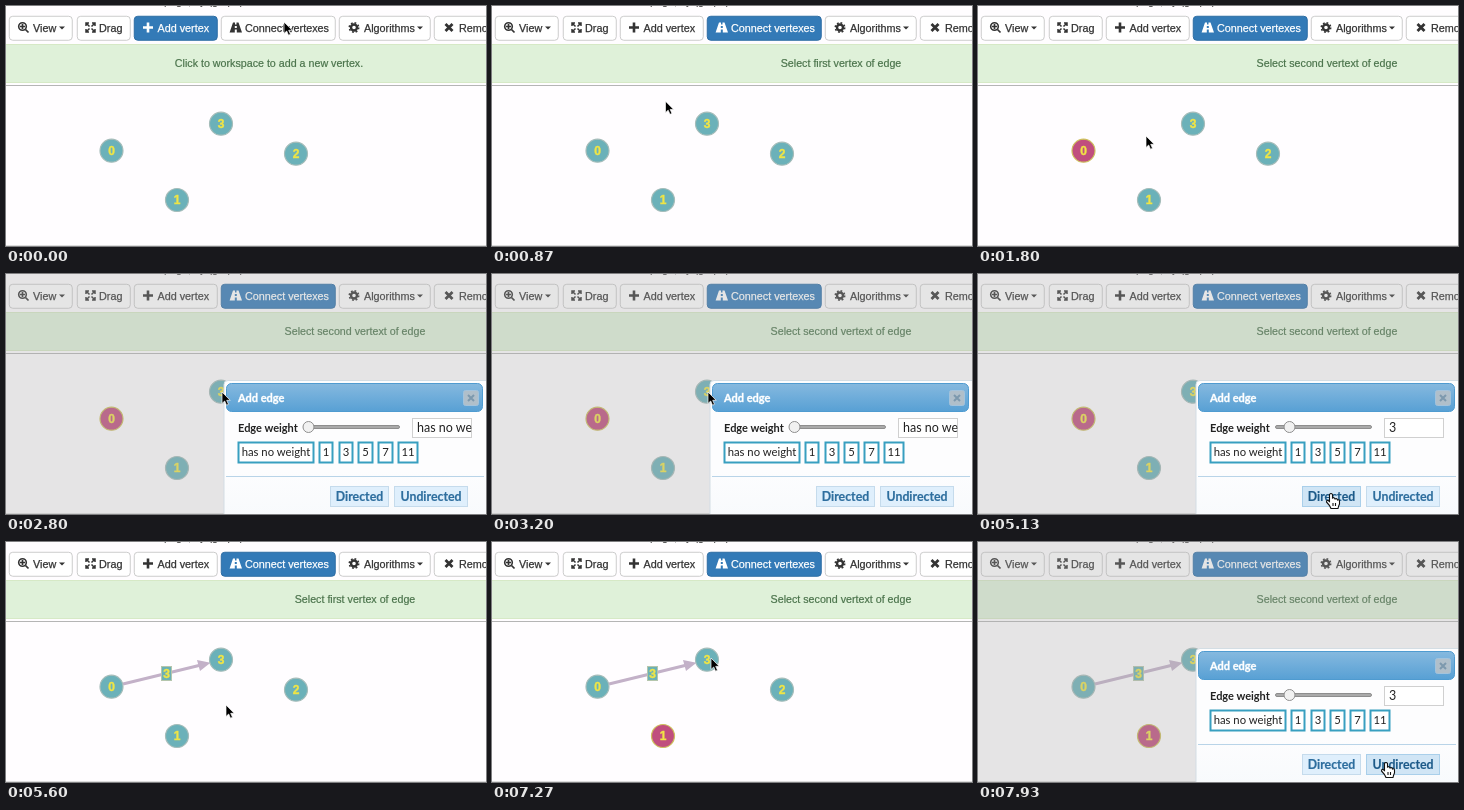
Recreate the animation shown at these times as an HTML page. Size 480x240 px, loop 8000 ms.

```html
<!DOCTYPE html>
<html lang="en">
<head>
<meta charset="utf-8">
<title>Graph editor</title>
<style>
html, body { margin: 0; width: 100%; height: 100%; overflow: hidden; background: #fffdff; }
svg { display: block; width: 480px; height: 240px; }
text { font: 10.8px "Liberation Sans", Arial, sans-serif; fill: #333; }
.btn rect { fill: #fff; stroke: #ccc; }
.btn { color: #333; }
.btn.active { color: #fff; }
.btn.active rect { fill: #337ab7; stroke: #2e6da4; }
.btn text { stroke: currentColor; stroke-width: .25; }
.btn text, .btn .solid { fill: currentColor; }
.btn .line { fill: none; stroke: currentColor; }
#message { font-size: 10.7px; fill: #4a734b; stroke: #4a734b; stroke-width: .2; text-anchor: middle; }
.vertex circle { fill: #6bb1b9; stroke: #a5bcb9; stroke-width: 1.2; }
.vertex.selected circle { fill: #c04e7e; stroke: #cdc05c; }
.vertex text, #edge text {
  font-size: 12px; font-weight: bold; text-anchor: middle;
  fill: #f0e545; stroke: #f0e545; stroke-width: .4;
}
#dialog text { font: 11.3px Lato, sans-serif; fill: #222; }
#dialog .bold { font-weight: bold; font-size: 11px; }
#dialog .title { fill: #fff; stroke: #fff; stroke-width: .35; }
#dialog .center text { text-anchor: middle; }
#dialog #field { font-size: 12.5px; }
.weight rect { fill: #fff; stroke: #389fc0; stroke-width: 2; }
.action rect { fill: #dfeffc; stroke: #c5dbec; }
#dialog .action text { font-size: 12.3px; font-weight: bold; fill: #2e6e9e; stroke: #2e6e9e; stroke-width: .2; }
.action.hover rect { fill: #d0e5f5; stroke: #a9cfea; }
#dialog .action.hover text { fill: #1d5987; }
</style>
</head>
<body>
<svg viewBox="0 0 480 240">
  <defs>
    <linearGradient id="gloss" x2="0" y2="1">
      <stop offset="0" stop-color="#86b9df"/>
      <stop offset=".4" stop-color="#73afdb"/>
      <stop offset="1" stop-color="#58a0d4"/>
    </linearGradient>
    <linearGradient id="body" x2="0" y2="1">
      <stop offset=".6" stop-color="#fdfdfe"/>
      <stop offset="1" stop-color="#f6f9fc"/>
    </linearGradient>
    <clipPath id="fieldClip"><rect x="407" y="146" width="58.5" height="18"/></clipPath>
  </defs>
  <rect width="480" height="240" fill="#fffdff"/>
  <text x="158" y="-1">page, by (graph)</text>
  <g id="toolbar"></g>
  <rect y="38" width="480" height="39" fill="#dff1d9"/>
  <path d="M0 38.5H480M0 76.5H480" stroke="#d6e9c6"/>
  <path d="M0 79.5H480" stroke="#b5b5b5"/>
  <path d="M0 239.5H480" stroke="#dcdcdc"/>
  <text id="message" y="61"></text>
  <g id="edge">
    <path d="M117 142L195 123" stroke="#c3b1c8" stroke-width="3"/>
    <path d="M191 118L204.500 120.700L194 129Z" fill="#c3b1c8"/>
    <rect x="155.500" y="124.500" width="10" height="14" fill="#6bb1b5" stroke="#b5c6ad"/>
    <text x="160.500" y="136">3</text>
  </g>
  <g id="vertices"></g>
  <rect id="dim" width="480" height="240" fill="#aaa" opacity=".3"/>
  <g id="dialog">
    <rect x="218" y="106.500" width="280" height="150" rx="4" fill="url(#body)" stroke="#d3dde4"/>
    <rect x="220.500" y="109.500" width="256" height="28" rx="5" fill="url(#gloss)" stroke="#4f9bd0"/>
    <text class="bold title" x="232" y="128">Add edge</text>
    <rect x="457.500" y="116.500" width="15" height="15" rx="2" fill="#b0bfca" stroke="#a3c3dc"/>
    <path d="M462 121l6 6m0-6l-6 6" stroke="#7d99ae" stroke-width="2"/>
    <text class="bold" x="232" y="158">Edge weight</text>
    <rect x="297.500" y="151.500" width="96" height="3" rx="1.500" fill="#aaa" stroke="#8e8e8e"/>
    <circle id="knob" cy="153" r="5.500" fill="#f1f1f1" stroke="#8f8f8f"/>
    <rect x="406.500" y="144.500" width="59" height="19" fill="#fff" stroke="#d0d0d0"/>
    <g clip-path="url(#fieldClip)"><text id="field" x="411" y="158"></text></g>
    <path d="M220 202.500H478" stroke="#b9d4e8"/>
    <g id="choices" class="center"></g>
  </g>
  <g id="pointer">
    <path id="arrow" d="M0 0V11.500L2.700 9L4.500 13.200L6.500 12.300L4.700 8.300H8.200Z" fill="#000" stroke="#fff" stroke-width=".7"/>
    <path id="hand" d="M-1.500 1V-4.500Q0-6.500 1.500-4.500V-1Q3-2 4 0Q6-1 6.500 1Q8.500 0 8.500 2.500V5Q7.500 7 7 9.500H0Q-1 6.500-4.500 3Q-4.500 0-1.500 2.500ZM2 4V7M4.500 4V7" fill="#fff" stroke="#111" stroke-width="1.100"/>
  </g>
</svg>
<script>
const $ = id => document.getElementById(id);
const box = (x, y, w, h, r = 0) =>
  `<rect x="${x + .5}" y="${y + .5}" width="${w}" height="${h}" rx="${r}"/>`;
const label = (x, y, text) => `<text x="${x}" y="${y}">${text}</text>`;

const icons = {
  zoom: '<path class="line" stroke-width="1.700" d="M19.500 23.500l3 3M14 20.500h5M16.500 18v5"/><circle class="line" stroke-width="1.600" cx="16.500" cy="20.500" r="3.800"/>',
  drag: '<path class="line" stroke-width="1.500" d="M80 20v-3h3m-3 0l3.500 3.500M89 20v-3h-3m3 0l-3.500 3.500M80 23v3h3m-3 0l3.500-3.500M89 23v3h-3m3 0l-3.500-3.500"/>',
  plus: '<path class="line" stroke-width="2.600" d="M137 21.500h10M142 16.500v10"/>',
  road: '<path class="solid" d="M227 16.500h2v2h1.500v-2h2l3.500 10h-5.200v-3h-2v3h-5.200zM228.800 20v2h2v-2z" fill-rule="evenodd"/>',
  cog: '<circle class="line" stroke-width="2.400" cx="348" cy="21.500" r="3"/><circle class="line" stroke-width="1.600" stroke-dasharray="1.800 1.885" cx="348" cy="21.500" r="4.700"/>',
  cross: '<path class="line" stroke-width="2.800" d="M439.500 18l7 7m0-7l-7 7"/>'
};
const caret = x => `<path class="solid" d="M${x} 20.500h6l-3 3z"/>`;

// id, left, width, text x, text, icon, extra
const buttons = [
  ['view', 3, 63, 27, 'View', icons.zoom, caret(53)],
  ['drag', 71, 53, 93, 'Drag', icons.drag, ''],
  ['add', 128, 83, 151.5, 'Add vertex', icons.plus, ''],
  ['connect', 215, 114, 239, 'Connect vertexes', icons.road, ''],
  ['algorithms', 333, 91, 358, 'Algorithms', icons.cog, caret(411)],
  ['remove', 428, 120, 453, 'Remove objects', icons.cross, '']
];
$('toolbar').innerHTML = buttons.map(([id, x, w, tx, text, icon, extra]) =>
  `<g class="btn" id="${id}">${box(x - .25, 9.75, w, 24, 3.5)}${icon}${label(tx, 25.5, text)}${extra}</g>`).join('');

const vertices = [[105.5, 144.7], [171, 194], [290, 147.7], [215, 117.7]];
$('vertices').innerHTML = vertices.map(([x, y], i) =>
  `<g class="vertex" id="v${i}"><circle cx="${x}" cy="${y}" r="11.500"/>${label(x, y + 4.2, i)}</g>`).join('');

const weights = [[232, 75, 'has no weight'], [313, 13, 1], [333, 13, 3], [352, 14, 5], [372, 14, 7], [392, 19, 11]];
const actions = [['directed', 324, 58, 'Directed'], ['undirected', 388, 73, 'Undirected']];
$('choices').innerHTML =
  weights.map(([x, w, text]) =>
    `<g class="weight">${box(x, 168, w, 20)}${label(x + w / 2 + .5, 182, text)}</g>`).join('') +
  actions.map(([id, x, w, text]) =>
    `<g class="action" id="${id}">${box(x, 212, w, 20)}${label(x + w / 2 + .5, 226.5, text)}</g>`).join('');

const LOOP = 8000;
const CONNECT = 400, PICK_FIRST = 1270, OPEN = 2760, SET_WEIGHT = 4470,
  CLOSE = 5140, PICK_SECOND = 6330, REOPEN = 7400;

// time, x, y of the pointer
const path = [
  [0, 278, 16], [150, 280, 18], [520, 280, 18], [1130, 106, 144], [1400, 106, 144],
  [1800, 168, 130], [2400, 216, 118], [3500, 216, 118], [4120, 344, 176], [4560, 344, 176],
  [4930, 353, 225], [5200, 353, 225], [5600, 220, 163], [6130, 171, 192], [6470, 171, 192],
  [7050, 219, 116], [7450, 219, 116], [7860, 408, 226], [8000, 408, 226]
];

function pointerAt(t) {
  const i = path.findIndex(step => step[0] > t);
  const [t0, x0, y0] = path[i - 1], [t1, x1, y1] = path[i];
  const p = (t - t0) / (t1 - t0), e = p * p * (3 - 2 * p);
  return [x0 + (x1 - x0) * e, y0 + (y1 - y0) * e];
}

const show = (id, on) => $(id).setAttribute('visibility', on ? 'visible' : 'hidden');
const toggle = (id, name, on) => $(id).classList.toggle(name, on);
const within = (t, from, to) => t >= from && t < to;

function draw(t) {
  const open = within(t, OPEN, CLOSE) || t >= REOPEN;
  const first = within(t, PICK_FIRST, CLOSE), second = t >= PICK_SECOND;
  const weighted = t >= SET_WEIGHT;
  const [x, y] = pointerAt(t);

  toggle('add', 'active', t < CONNECT);
  toggle('connect', 'active', t >= CONNECT);
  toggle('v0', 'selected', first);
  toggle('v1', 'selected', second);
  $('message').setAttribute('x', t < CONNECT ? 263 : 349);
  $('message').textContent = t < CONNECT ? 'Click to workspace to add a new vertex.'
    : first || second ? 'Select second vertext of edge' : 'Select first vertex of edge';

  show('edge', t >= CLOSE);
  show('dim', open);
  show('dialog', open);
  $('knob').setAttribute('cx', weighted ? 311.5 : 302.5);
  $('field').textContent = weighted ? '3' : 'has no weight';

  const overAction = open && within(y, 212, 233);
  for (const [id, left, width] of actions)
    toggle(id, 'hover', overAction && within(x, left, left + width));
  const hand = open && (overAction && x > 324 || within(y, 168, 190) && within(x, 232, 412));
  show('hand', hand);
  show('arrow', !hand);
  $('pointer').setAttribute('transform', `translate(${x} ${y})`);
}

const start = performance.now();
function tick() {
  draw((performance.now() - start) % LOOP);
  requestAnimationFrame(tick);
}
tick();
</script>
</body>
</html>
```
